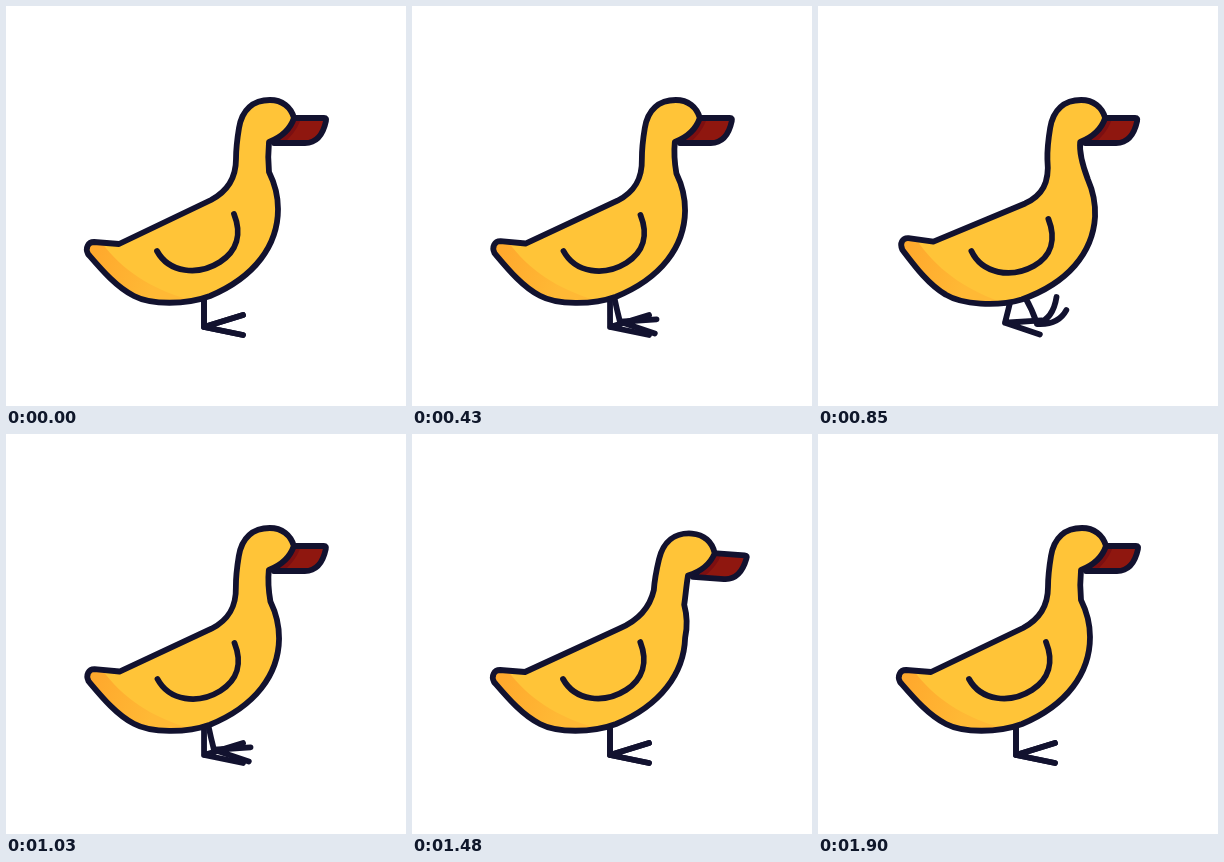
An HTML page for the animation above (1960 ms loop, 400 by 400 pixels).

```html
<!DOCTYPE html>
<html lang="en">
<head>
<meta charset="utf-8">
<title>Walking duck</title>
<style>
  html, body { margin: 0; width: 100%; height: 100%; overflow: hidden; background: #fff; }
  svg { display: block; width: 100%; height: 100%; }
  .line { fill: none; stroke: #12122f; stroke-width: 5.8; stroke-linecap: round; stroke-linejoin: round; }
</style>
</head>
<body>
<svg viewBox="0 0 400 400">
  <defs>
    <clipPath id="bodyClip"><path data-shape="body"/></clipPath>
    <clipPath id="beakClip"><path data-shape="beak"/></clipPath>
    <linearGradient id="tail" gradientUnits="userSpaceOnUse" x1="88" y1="250" x2="150" y2="272">
      <stop offset="0" stop-color="#ffa92d"/>
      <stop offset="1" stop-color="#ffb935"/>
    </linearGradient>
  </defs>
  <path id="legA" class="line"/>
  <path id="legB" class="line"/>
  <path data-shape="beak" fill="#8f170f"/>
  <path data-shape="beakShade" clip-path="url(#beakClip)" fill="#7c0f11"/>
  <path data-shape="beak" class="line"/>
  <path data-shape="body" fill="#ffc438"/>
  <path data-shape="tailShade" clip-path="url(#bodyClip)" fill="url(#tail)"/>
  <path data-shape="body" class="line"/>
  <path data-shape="wing" class="line"/>
</svg>
<script>
const LOOP = 1960, HOLD = 130, STEP = 30, LAST = 60;
const STRIDE = 20;       // steps per full cycle of one leg
const WALK_END = 39;

// The duck at rest
const shapes = {
  body: `M113 238L205 194C222 185 230 172 230 153C230 143 231 134 233 122
    C236 104 247 94 264 94C276 94 285 101 288 112C284 124 276 131 263 136
    C262 146 262 156 263 166C269 178 272 190 272 203C272 239 249 271 204 290
    C180 299 145 299 128 290C110 281 95 263 82 248C79 242 82 236 88 236Z`,
  wing: "M228 208C236 228 231 245 214 256C192 270 163 267 151 245",
  beak: "M287 112L318 112Q321 112 320 115C317 129 311 137 299 137L268 137Z",
  beakShade: "M260 105L297 105C294 120 287 129 275 140L260 140Z",
  tailShade: "M78 222L96 237C116 264 145 283 184 294L150 312L66 262Z"
};

const clamp = v => Math.min(1, Math.max(0, v));
const ease = v => { const t = clamp(v); return t * t * (3 - 2 * t); };
const bump = (i, from, to) => Math.sin(Math.PI * clamp((i - from) / (to - from))) ** 2;
const gaitAt = i => Math.min(ease(i / 4), ease((WALK_END - i) / 5));

function poseAt(i) {
  // Each footfall lifts the tail, then lets it drop a little
  const beat = (i % (STRIDE / 2)) / (STRIDE / 2);
  const sway = gaitAt(i) * Math.sin(2 * Math.PI * beat ** 1.55);
  const up = Math.max(sway, 0);
  const down = Math.max(-sway, 0) * 0.5 + bump(i, 33, 41);
  const nod = bump(i, 38, 54);
  return {
    tilt: 0.075 * up - 0.035 * down,
    drop: 3 * down,
    headX: 13 * nod - up - 4 * down,
    headY: 5.5 * nod - 2 * down,
    headTurn: 0.07 * nod
  };
}

// The body tilts about the belly; the neck blends it into the head
function deform(x, y, p) {
  const bodyPart = clamp((y - 152) / 10), headPart = clamp((210 - y) / 52);
  const reach = x > 250 ? 285 - y : Math.min(285 - y, 38);
  const bodyX = p.tilt * reach, bodyY = p.tilt * (x - 150) + p.drop;
  const headX = p.headX - p.headTurn * (y - 136);
  const headY = p.headY + p.headTurn * (x - 263);
  return [x + bodyPart * bodyX + headPart * headX, y + bodyPart * bodyY + headPart * headY];
}

function drawDuck(pose) {
  for (const path of document.querySelectorAll("[data-shape]")) {
    const d = shapes[path.dataset.shape].replace(/(\d+) (\d+)/g,
      (_, x, y) => deform(+x, +y, pose).map(v => v.toFixed(2)).join(" "));
    path.setAttribute("d", d);
  }
}

function drawLeg(id, i, offset) {
  const q = (i + offset) % STRIDE, gait = gaitAt(i);
  const air = clamp((q - 4) / 16);
  const swing = gait * Math.sin(2 * Math.PI * air);
  const push = Math.max(swing, 0), curl = Math.max(-swing, 0);

  const x = 198 + gait * (5 - 16 * Math.sin(2 * Math.PI * q / STRIDE));
  const y = 321 - gait * 6 * Math.sin(Math.PI * Math.sqrt(air));
  const hipX = 198 + (x - 198) * 0.4;
  const pitch = (18 * push - 40 * curl) * Math.PI / 180;
  const size = 1 - 0.2 * Math.abs(swing);
  const c = Math.cos(pitch) * size, s = Math.sin(pitch) * size;

  const toe = rise => {
    const tx = 39 * c - rise * s, ty = 39 * s + rise * c;
    return `M${x} ${y}q${tx / 2 + 7 * curl} ${ty / 2 + 9 * curl} ${tx} ${ty}`;
  };
  const shin = `M${hipX} 290Q${(hipX + x) / 2 + 2 * curl} 304 ${x} ${y}`;
  document.getElementById(id).setAttribute("d", shin + toe(12 * push - 12) + toe(8));
}

function draw(now) {
  const t = now % LOOP;
  const i = t < HOLD ? 0 : Math.min(LAST, 1 + Math.floor((t - HOLD) / STEP));
  drawDuck(poseAt(i));
  drawLeg("legA", i, 0);
  drawLeg("legB", i, STRIDE / 2);
}

const start = performance.now();
function tick() {
  draw(performance.now() - start);
  requestAnimationFrame(tick);
}
tick();
</script>
</body>
</html>
```
